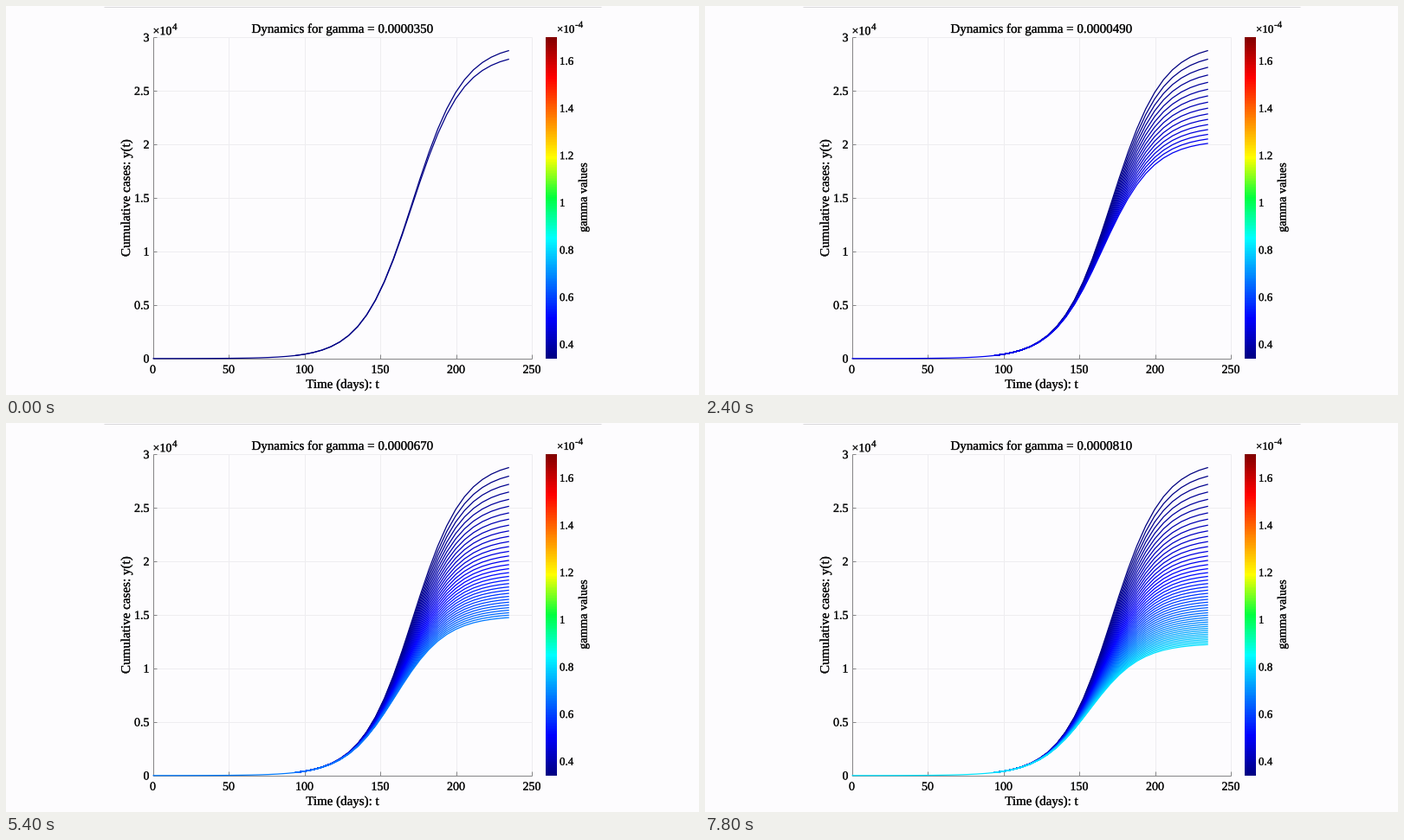
Animation, 800 px wide and 450 px high, one loop 8 s. Source, as a matplotlib script:

```python
import matplotlib.pyplot as plt
import numpy as np
from matplotlib.animation import FuncAnimation
from matplotlib.collections import LineCollection
from matplotlib.patheffects import withStroke

W, H, DPI = 800, 450, 100
FRAMES, INTERVAL = 40, 200
LEFT, RIGHT, TOP, BOTTOM = 169.5, 607.0, 36.3, 407.8
BAR_L, BAR_R = 623, 636
T_MAX, Y_MAX = 250, 3e4
G_MIN, G_MAX = 34, 170          # gamma in units of 1e-6
GROWTH, T_END = 0.06, 235
SPLIT = 16                      # the curves only separate after this point
BACK, AXIS, GRID, INK = "#fdfcfe", "#868688", "#eeedf0", "#0c0c0c"

plt.rcParams["font.family"] = "Liberation Serif"
plt.rcParams["text.hinting"] = "none"
fig = plt.figure(figsize=(W / DPI, H / DPI), dpi=DPI, facecolor=BACK)
ax = fig.add_axes([0, 0, 1, 1])
ax.axis("off")


def px(size):
    return size * 72 / DPI


def to_x(t):
    return LEFT + t * (RIGHT - LEFT) / T_MAX


def to_y(v):
    return BOTTOM - v * (BOTTOM - TOP) / Y_MAX


def bar_y(g):
    return BOTTOM - (g - G_MIN) / (G_MAX - G_MIN) * (BOTTOM - TOP)


def line(x0, y0, x1, y1, color, z=2):
    ax.plot([x0, x1], [y0, y1], color=color, lw=px(1), zorder=z,
            solid_capstyle="butt")


def label(x, y, text, size=14, ha="center", rotation=0):
    return ax.text(x, y, text, fontsize=px(size), ha=ha, va="baseline",
                   color=INK, rotation=rotation, rotation_mode="anchor",
                   zorder=6,
                   path_effects=[withStroke(linewidth=px(0.25), foreground=INK)])


def jet(x):
    """Rainbow from dark blue to dark red, with a fuller green."""
    x = np.asarray(x, float)
    rgb = np.stack([np.clip(1.5 - abs(4 * x - c), 0, 1) for c in (3, 2, 1)], -1)
    pale = np.minimum(rgb[..., 0], rgb[..., 2])
    rgb[..., 0] -= pale
    rgb[..., 2] -= 0.5 * pale
    return rgb


def curve(g):
    """Logistic growth from one case up to a ceiling of 1/gamma."""
    t = np.linspace(0, T_END, 41)
    cap = 1e6 / g
    e = np.exp(GROWTH * t)
    return np.column_stack([to_x(t), to_y(cap * e / (cap - 1 + e))])


def draw_axes():
    line(113, 0.5, 687, 0.5, "#d9d8db")
    for t in range(0, T_MAX + 1, 50):
        x = to_x(t)
        if t:
            line(x, TOP, x, BOTTOM, GRID, z=1)
        line(x, BOTTOM, x, BOTTOM - 4.5, AXIS)
        label(x, 424.7, str(t))
    for i in range(7):
        y = to_y(i * 5000)
        if i:
            line(LEFT, y, RIGHT, y, GRID, z=1)
        line(LEFT, y, LEFT + 4.5, y, AXIS)
        label(165.5, y + 4.7, f"{i / 2:g}", ha="right")
    line(LEFT, TOP, LEFT, BOTTOM, AXIS)
    line(LEFT, BOTTOM, RIGHT, BOTTOM, AXIS)
    label(169.5, 33.2, "×10", ha="left")
    label(192, 27.5, "4", 11, ha="left")
    label(388.5, 442, "Time (days): t", 15)
    label(143, 222, "Cumulative cases: y(t)", 15.1, rotation=90)


def draw_bar():
    ramp = jet((np.arange(256) + 0.5) / 256)[::-1, None, :]
    ax.imshow(ramp, extent=(BAR_L, BAR_R, BOTTOM, TOP), aspect="auto",
              interpolation="nearest", zorder=2)
    for g in range(40, 161, 20):
        label(639, bar_y(g) + 4.3, f"{g / 100:g}", 13, ha="left")
    label(636, 31, "×10", 13, ha="left")
    label(657, 25, "-4", 11, ha="left")
    label(670.5, 221.5, "gamma values", 14, rotation=90)


draw_axes()
draw_bar()
title = label(388.3, 31, "", 15)

gammas = np.arange(G_MIN, 83)
curves = [curve(g) for g in gammas]
colors = jet((gammas - G_MIN) / (G_MAX - G_MIN))
lines = LineCollection([], linewidths=px(1.25), zorder=5)
ax.add_collection(lines, autolim=False)
ax.set_xlim(0, W)
ax.set_ylim(H, 0)


def update(i):
    # six new curves for every five pictures
    n = 2 + i * 6 // 5
    lines.set_segments([c[SPLIT:] for c in curves[:n - 1]] + [curves[n - 1]])
    lines.set_color(colors[:n])
    title.set_text(f"Dynamics for gamma = {gammas[n - 1] * 1e-6:.7f}")
    return lines, title


anim = FuncAnimation(fig, update, frames=FRAMES, interval=INTERVAL,
                     repeat=True, repeat_delay=0)
plt.show()
```
